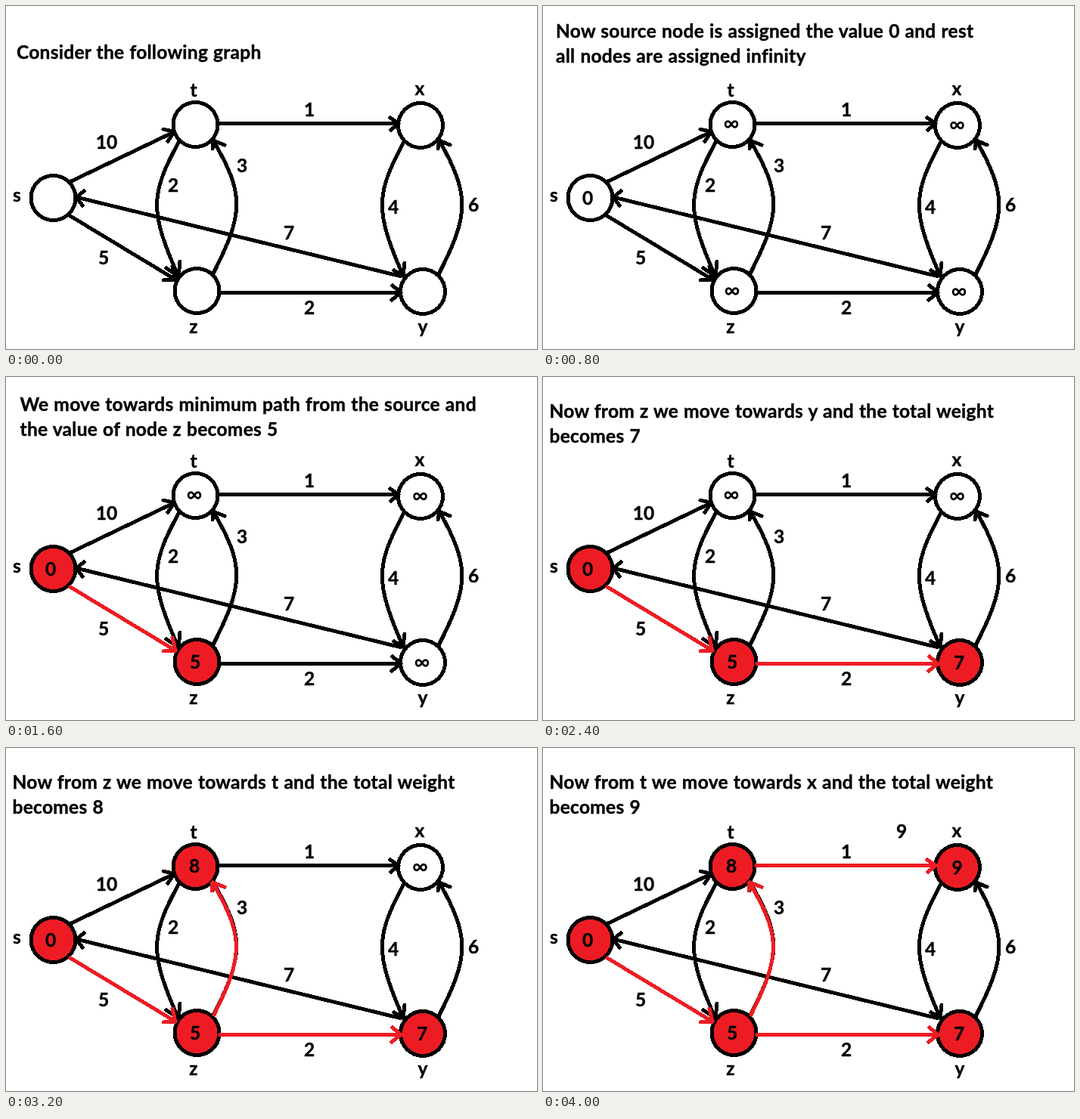
An HTML page that plays this animation: 702x454 px, repeating every 4800 ms.

```html
<!DOCTYPE html>
<html lang="en">
<head>
<meta charset="utf-8">
<title>Shortest paths</title>
<style>
  html, body { margin: 0; width: 100%; height: 100%; overflow: hidden; background: #fff; }
  svg { display: block; }
  text { font: 700 24.5px Lato, Carlito, sans-serif; stroke: #000; stroke-width: .4px; }
  .title { letter-spacing: .28px; word-spacing: .7px; }
  .label { text-anchor: middle; }
  path, circle {
    fill: none; stroke: #000; stroke-width: 5; stroke-linecap: round; stroke-linejoin: round;
    shape-rendering: crispEdges;
  }
  circle { fill: #fff; }
  .infinity { stroke-width: 2.7; shape-rendering: auto; }
</style>
</head>
<body>
<svg id="stage" width="702" height="454" viewBox="0 0 702 454"></svg>
<script>
const RED = '#ed1c24', STEP = 800, STEPS = 6;
const stage = document.getElementById('stage');

function add(tag, attrs, content = '') {
  const el = document.createElementNS('http://www.w3.org/2000/svg', tag);
  for (const key in attrs) el.setAttribute(key, attrs[key]);
  el.textContent = content;
  return stage.appendChild(el);
}
const label = (content, x, y) => add('text', { class: 'label', x, y }, content);

// Each title: x, first baseline, lines
const titles = [
  [14, 70, 'Consider the following graph'],
  [17, 42, 'Now source node is assigned the value 0 and rest', 'all nodes are assigned infinity'],
  [18.5, 45, 'We move towards minimum path from the source and', 'the value of node z becomes 5'],
  [8.5, 54, 'Now from z we move towards y and the total weight', 'becomes 7'],
  [8.5, 54, 'Now from z we move towards t and the total weight', 'becomes 8'],
  [8.5, 54, 'Now from t we move towards x and the total weight', 'becomes 9']
].map(([x, y, ...lines]) =>
  lines.map((line, i) => add('text', { class: 'title', x, y: y + 33 * i }, line)));

// Centre, name and its place, value and its place, step at which the node is reached
const nodes = [
  [62.5, 254, 's', 14.5, 259, 0, 59, 254, 2],
  [250.5, 157, 't', 248, 120, 8, 249, 156.5, 4],
  [548, 158, 'x', 547, 118, 9, 547.5, 158, 5],
  [252.5, 377, 'z', 248, 433, 5, 250, 377.5, 2],
  [551, 378, 'y', 551, 433, 7, 550, 378.5, 3]
].map(([cx, cy, name, nx, ny, value, vx, vy, reached]) => {
  const ring = add('circle', { cx, cy, r: 29.5 });
  label(name, nx, ny);
  return { ring, value, vx, vy, reached };
});

// Line, arrowhead, weight and its place, step at which it turns red
const edges = [
  ['M85 232.5L222.5 166.5', 'M208 163L222.5 166.5L214 179', 10, 133, 189],
  ['M229 179C190 250 190 272 228 358', 'M212 347L228 358L230 338', 2, 221, 246],
  ['M274 354C314 275 316 250 274 178', 'M273 189L274 178L289 184', 3, 312, 220],
  ['M526 180C488 250 488 272 525 357', 'M513 350L525 357L527 340', 4, 512, 275],
  ['M572 355C613 275 613 250 573 178', 'M571 189L573 178L587 184', 6, 618, 272],
  ['M521 357.5L93 253', 'M103 245L93 253L101 264', 7, 374, 309],
  ['M85 278L224 362', 'M220 345L224 362L208 363', 5, 129, 342, 2],
  ['M283 379.5L522 379.5', 'M511 370L522 379.5L510 389', 2, 401, 408, 3],
  ['M282 155.5L519 155.5', 'M508 148L519 155.5L509 164', 1, 401, 146, 5]
].map(([line, head, weight, x, y, redFrom = STEPS]) => {
  label(weight, x, y);
  return { path: add('path', { d: line + head }), redFrom };
});
const redCurve = add('path', {
  d: 'M275 353C314 275 315 250 273 178M272 189L273 178L289 184', style: `stroke:${RED}`
});

for (const node of nodes) {
  node.infinity = add('path', {
    class: 'infinity',
    d: 'M0 0C-2-3-3.5-3.8-4.6-3.8C-9-3.8-9 3.8-4.6 3.8C-3.5 3.8-2 3 0 0C2-3 3.5-3.8 4.6-3.8C9-3.8 9 3.8 4.6 3.8C3.5 3.8 2 3 0 0',
    transform: `translate(${node.vx} ${node.vy})`
  });
  node.text = label(node.value, node.vx, node.vy + 8.5);
}
const strayNine = label(9, 474, 119);

const show = (el, visible) => { el.style.display = visible ? '' : 'none'; };

function render(step) {
  titles.forEach((lines, i) => lines.forEach(line => show(line, i === step)));
  for (const { ring, value, infinity, text, reached } of nodes) {
    const known = step >= (value === 0 ? 1 : reached);
    ring.style.fill = step >= reached ? RED : '#fff';
    show(text, known);
    show(infinity, step >= 1 && !known);
  }
  for (const { path, redFrom } of edges) path.style.stroke = step >= redFrom ? RED : '#000';
  show(redCurve, step >= 4);
  show(strayNine, step === 5);
}

const start = performance.now();
function tick() {
  render(Math.floor((performance.now() - start) / STEP) % STEPS);
  requestAnimationFrame(tick);
}
render(0);
requestAnimationFrame(tick);
</script>
</body>
</html>
```
